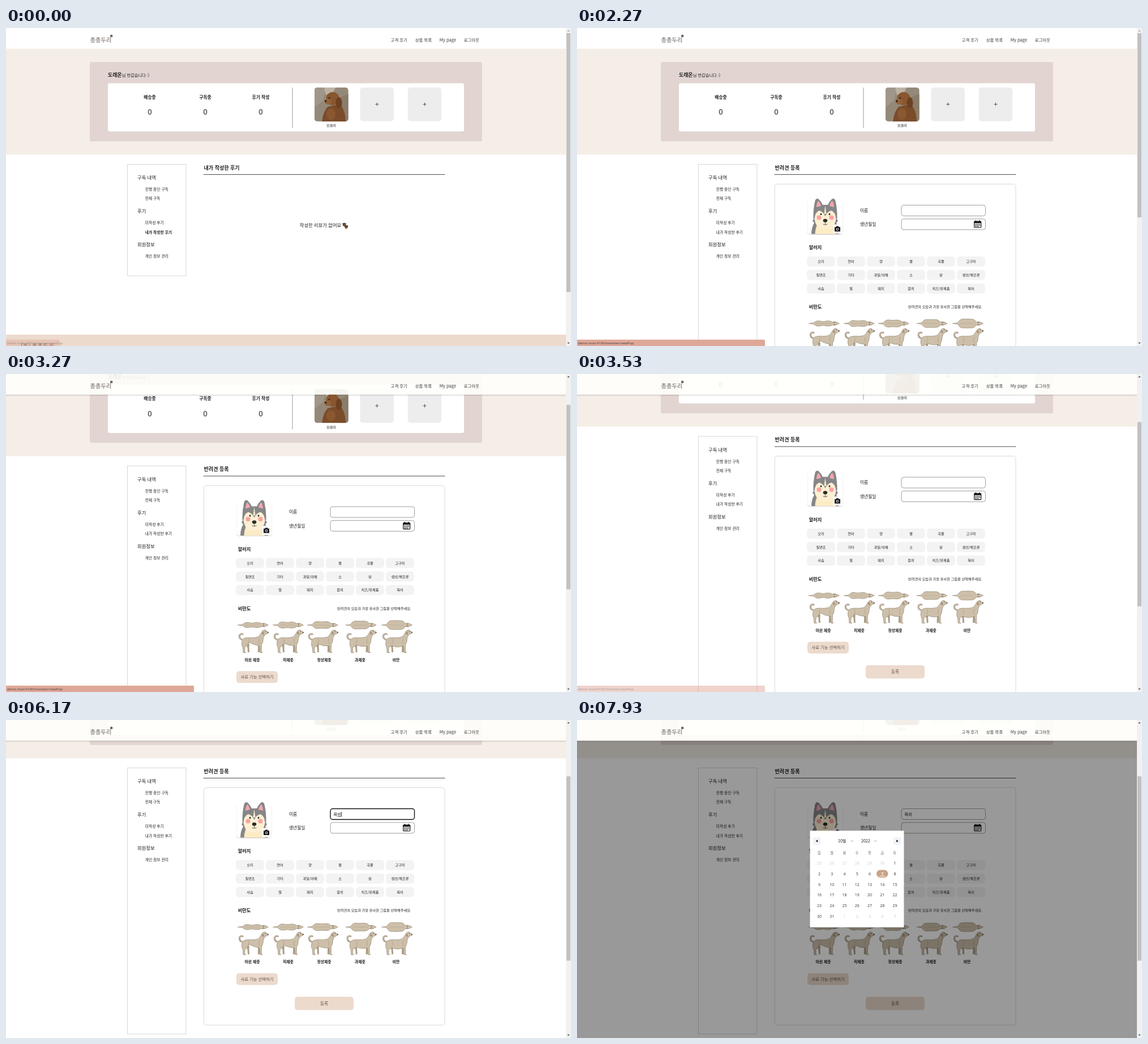
An HTML page for the animation above (8000 ms loop, 998 by 561 pixels).

```html
<!DOCTYPE html>
<html lang="ko">
<head>
<meta charset="utf-8">
<title>반려견 등록</title>
<style>
html, body { margin: 0; width: 100%; height: 100%; overflow: hidden; background: #fff; }
svg { display: block; width: 100vw; height: 100vh; }
text { font-family: "Noto Sans CJK KR", "Noto Sans KR", "Noto Sans CJK", "Noto Sans CJK JP", sans-serif; white-space: pre; }
.latin { font-family: "Noto Sans", "Open Sans", sans-serif; }
</style>
</head>
<body>
<svg id="stage" viewBox="0 0 998 561" xmlns="http://www.w3.org/2000/svg"></svg>
<script>
const LOOP = 8000;
const NOTCH = 52, SCROLLED = NOTCH * 3;
const BRAND = '총총두리', OWNER = '도래온', PET = '보슬이', LINK = 'demo-host:4100/member/newPup';

// y is the vertical middle of the glyphs
const text = (x, y, str, size, o = {}) =>
  `<text x="${x}" y="${(y + size * 0.37).toFixed(2)}" font-size="${size}" fill="${o.fill || '#1c1c1c'}"` +
  ` font-weight="${o.w || 500}" text-anchor="${o.mid ? 'middle' : 'start'}"` +
  `${o.cls ? ` class="${o.cls}"` : ''}${o.id ? ` id="${o.id}"` : ''}>${str}</text>`;
const mid = (x, y, str, size, o = {}) => text(x, y, str, size, { ...o, mid: true });
const box = (x, y, w, h, fill, r = 0, extra = '') =>
  `<rect x="${x}" y="${y}" width="${w}" height="${h}" rx="${r}" fill="${fill}" ${extra}/>`;
const path = (d, fill, extra = '') => `<path d="${d}" fill="${fill}" ${extra}/>`;
const dot = (x, y, r, fill, ry = r) => `<ellipse cx="${x}" cy="${y}" rx="${r}" ry="${ry}" fill="${fill}"/>`;
const group = (id, body, extra = '') => `<g id="${id}" ${extra}>${body}</g>`;

function photo() {
  return `<g clip-path="url(#photoClip)">` +
    box(545, 105, 60, 60, '#948979') +
    path('M545 105H566L560 128L545 140Z', '#a0968a') +
    path('M562 105H582L578 114L565 118Z', '#bdb3a4') +
    path('M586 124L605 116V165H586Z', '#8a7c6a') +
    path('M558 165Q560 148 568 139L590 134Q600 146 600 165Z', '#7b4c2a') +
    dot(577, 124.5, 11.5, '#88562f', 11.5) + dot(588, 132, 5.5, '#6c4123', 10) +
    dot(569, 130, 6, '#93613a', 5) + dot(574, 152, 8, '#8a5831', 10) +
    dot(564.6, 129, 1.7, '#2a1a12') + dot(571, 123.5, 1.2, '#2a1a12') + '</g>';
}

function addTile(x) {
  return box(x, 105, 59.5, 59.5, '#ededed', 5) +
    path(`M${x + 26.8} 134.5h6M${x + 29.8} 131.5v6`, 'none', 'stroke="#444" stroke-width=".9"');
}

function summary() {
  let s = box(0, 36.5, 990, 187, '#f5eee7') + box(148, 60, 693, 140, '#e2d5d1', 3) +
    text(180, 83, OWNER, 8.9, { w: 700 }) + text(204.7, 83.6, '님 반갑습니다 :)', 7.25) +
    box(180, 98.2, 629, 85.3, '#d3c7c3', 3) + box(180, 97.5, 629, 85.3, '#fff', 3);
  ['배송중', '구독중', '후기 작성'].forEach((name, i) => {
    s += mid(254 + 98 * i, 122, name, 7.8, { w: 600 }) + mid(254 + 98 * i, 148, '0', 13.5, { w: 700, fill: '#666' });
  });
  return s + box(505.5, 105, 1, 71, '#999') + photo() + mid(574.5, 171.7, PET, 6.2) +
    addTile(625.5) + addTile(709.7);
}

function menu(height, active) {
  const heads = [['구독 내역', 264.3], ['후기', 323], ['회원정보', 382]];
  const items = [['진행 중인 구독', 284.5], ['전체 구독', 300.6], ['미작성 후기', 343.8],
    ['내가 작성한 후기', 360], ['개인 정보 관리', 402.6]];
  return box(214.5, 240.5, 103.5, height, '#fff', 0, 'stroke="#d2d2d2" stroke-width=".9"') +
    heads.map(([n, y]) => text(232, y, n, 8.3)).join('') +
    items.map(([n, y], i) => text(245.8, y, n, 6.75, { w: i === active ? 700 : 500 })).join('');
}

const title = name => text(349.6, 246.3, name, 9, { w: 700 }) + box(348.7, 258, 426.8, 1, '#4c4c4c');

function paw(x, y) {
  return dot(x, y + .8, 2.6, '#5c3a22', 2.3) +
    [-2.2, 0, 2.2].map(d => dot(x + d, y - 2 + Math.abs(d) * .3, 1.1, '#3a2417')).join('') +
    dot(x, y + 1.2, 1.2, '#a8744f', .9);
}

function emptyView() {
  return menu(196.5, 3) + title('내가 작성한 후기') +
    text(518.8, 348, '작성한 리뷰가 없어요', 8.3) + paw(597.5, 346.7) + paw(601, 350.8) +
    box(0, 541, 990, 130, '#ecdacd') + text(26, 561.5, `(주) ${BRAND}`, 10.6, { fill: '#4c403a' });
}

// Everything inside the form is laid out for the fully scrolled page
function husky() {
  return path('M414 207.5Q414 196 419 188L416 184L420 178H457L461 184L458 188Q463 196 463 207.5Z', '#868688') +
    path('M417.5 180Q417 164 420.5 149Q422.5 143 427 146Q432 151 434 156H443Q445 151 450 146Q454.5 143 456.5 149Q460 164 459.5 180Z', '#868688') +
    path('M423 160Q423.5 151 426.5 149Q430.5 154 431 158Z', '#f3a7ae') +
    path('M454 160Q453.5 151 450.5 149Q446.5 154 446 158Z', '#f3a7ae') +
    path('M420.5 207.5Q421 196 425 190L452 190Q456 196 456.5 207.5Z', '#fcebc5') +
    path('M419.5 182Q420 169 428 166Q435 168 438.5 176Q442 168 449 166Q457 169 457.5 182Q455 193 449 198H428Q422 193 419.5 182Z', '#fdefd2') +
    path('M438.5 157L440.5 172H436.5Z', '#fdefd2') +
    dot(427.5, 178.5, 4, '#f7a3a6') + dot(449.5, 178.5, 4, '#f7a3a6') +
    dot(431, 172.5, 1.4, '#2b2b2b', 1.7) + dot(446, 172.5, 1.4, '#2b2b2b', 1.7) +
    dot(438.5, 183.7, 3.8, '#2b2b2b', 3) +
    path('M434.5 190Q438.5 192.5 442.5 190M438.5 185V191', 'none', 'stroke="#2b2b2b" stroke-width=".7"');
}

const camera = () => box(452, 190.5, 16.5, 16, '#fff', 4) +
  path('M455 195.2H457.3L458.4 193.6H461.6L462.7 195.2H465V203H455Z', '#111') +
  dot(460, 199, 2.3, '#fff') + dot(460, 199, 1.4, '#111');

function calendarIcon() {
  let s = box(701.7, 185.2, 12, 10.8, '#fff', 1, 'stroke="#111" stroke-width="1.2"') +
    box(701.5, 185, 12.4, 3.2, '#111') + box(703.6, 183.2, 1.6, 3.4, '#111', .6) + box(710.2, 183.2, 1.6, 3.4, '#111', .6);
  for (let i = 0; i < 11; i++) s += box(703.4 + (i % 4) * 2.4, 189.4 + (i >> 2) * 2.1, 1.5, 1.3, '#111');
  return s;
}

function bodyShape(x, fat) {
  const line = 'stroke="#857760" stroke-width=".6" stroke-linejoin="round"', tan = '#cdbfa9';
  const hip = 4.6 + fat * .8, waist = 2.2 + fat * 1.5;
  const half = `M0 0L9 -1.2Q13 ${-hip - 1} 19 ${-hip}Q26 ${-waist} 32 ${-hip}Q38 ${-hip - .6} 42 -2.6Q46 -4.2 50 -2L54 0`;
  const back = 'M36 25L35.5 40H37.6L39.5 27ZM15 26L17.2 33L17.6 40H19.6L19.2 32L19.6 26Z';
  const side = `M8 18Q12 14 20 14.6Q28 15.4 35 13.4Q39 11 41 6Q43 1.5 46.5 1Q49 .6 50 3L53.6 4.8Q54 7.2 49.4 8.4Q46 10 44.6 16` +
    `Q44.6 23 41.6 27L41.4 39.4L43.4 41H39L37.6 29Q28 ${27.5 + fat * 1.4} 20 ${23 + fat * 1.6}` +
    `Q17 28 12.4 31.5L11.8 39.4L14 41H9.2L8.6 32.5Q5 26 8 18Z`;
  const tail = w => `stroke-width="${w}" stroke-linecap="round"`;
  const tailLine = 'M9.5 19Q1.4 17 2.6 11Q4.6 7 8.4 8.5';
  return `<g transform="translate(${x} 365.3)">${path(half, tan, line)}<g transform="scale(1 -1)">${path(half, tan, line)}</g>` +
    path('M12 0H40', 'none', 'stroke="#b3a288" stroke-width=".7"') +
    path('M44 -3L47 -1.5L45 0ZM44 3L47 1.5L45 0Z', '#8f7f68') + '</g>' +
    `<g transform="translate(${x + .5} 373)">` +
    path(tailLine, 'none', 'stroke="#857760" ' + tail(2.7)) + path(back, '#b5a58c', line) + path(side, tan, line) +
    path(tailLine, 'none', `stroke="${tan}" ` + tail(1.6)) +
    path('M43 4Q46 4 46 9Q43 10 42.4 7Z', '#a3927a') + dot(53, 5.4, .9, '#332b22') + dot(48.5, 3.6, .6, '#332b22') +
    path('M38 16Q35 21 38 26M18 17Q21 21 17 26', 'none', 'stroke="#a89880" stroke-width=".7"') + '</g>';
}

function formView() {
  const field = (y, id) => box(573, y, 148.5, 19, '#fff', 4, `id="${id}"`);
  const chips = ['오리 연어 양 쌀 곡물 고구마', '칠면조 기타 과일/야채 소 닭 생선/해조류', '사슴 밀 돼지 참치 치즈/유제품 북어'];
  const levels = ['야윈 체중', '저체중', '정상체중', '과체중', '비만'];
  const starts = [409.3, 471.3, 532.3, 600, 663.5];
  let s = box(349.3, 119.3, 425.7, 418.9, '#fff', 4.5, 'stroke="#d9d4cf" stroke-width=".9"') +
    box(407, 147, 62.5, 61.8, '#000', 5, 'opacity=".16"') + box(407.3, 146, 62, 61.8, '#fff', 5) +
    group('portrait', husky()) + camera() +
    text(499.7, 166, '이름', 7.8) + text(499.7, 190.3, '생년월일', 7.8) +
    field(156.5, 'nameField') + field(180.8, 'dateField') + calendarIcon() +
    text(578.6, 166.2, '', 7.3, { id: 'petName', w: 400 }) +
    box(586, 170.1, 6.6, .7, '#222', 0, 'id="compose"') + box(578.3, 162, .9, 8.2, '#111', 0, 'id="caret"') +
    text(409.7, 231.2, '알러지', 8.25, { w: 600 }) + text(409.7, 336, '비만도', 8.25, { w: 600 }) +
    text(585, 336, '반려견의 모습과 가장 유사한 그림을 선택해주세요.', 6.22);
  chips.forEach((row, r) => row.split(' ').forEach((name, c) => {
    const x = 406 + 53 * c, y = 247 + 23.8 * r;
    s += box(x, y, 50, 17.8, '#f3f3f3', 5.5) + mid(x + 25, y + 9, name, 6.2);
  }));
  s += group('bodies', starts.map(bodyShape).join(''));
  levels.forEach((name, i) => { s += mid(435 + 63.5 * i, 426.5, name, 6.8, { w: 600 }); });
  s += box(407, 446.8, 73, 20.7, '#ecdacd', 5) + mid(443.5, 457, '사료 기능 선택하기', 7.35, { fill: '#5f5047' }) +
    box(510, 488.3, 104, 23.4, '#ecdacd', 5) + mid(562, 500, '등록', 7.5, { fill: '#5f5047' });
  return menu(469.5, -1) + title('반려견 등록') + `<g transform="translate(0 ${SCROLLED})">${s}</g>`;
}

function header() {
  const o = { w: 500, fill: '#3c3c3c' };
  return group('bar', box(0, 0, 990, 36.5, '#fffffc', 0, 'opacity=".9"') + box(0, 36.5, 990, 3, 'url(#shade)')) +
    text(148.5, 20.7, BRAND, 10.3, { w: 400, fill: '#6b625c' }) + dot(186.2, 14, 2.3, '#6b625c') +
    text(679.6, 21, '고객 후기', 7.4, o) + text(722.7, 21, '상품 목록', 7.4, o) +
    text(765.7, 21, 'My page', 7.6, o) + text(808.7, 21, '로그아웃', 7.4, o);
}

function datePicker() {
  const colX = c => 428 + 22.25 * c;
  const chevron = x => path(`M${x - 2} 212.6l2 2l2 -2`, 'none', 'stroke="#777" stroke-width=".8"');
  let s = box(411.5, 196, 166, 171, '#000', 1, 'opacity=".12"') + box(411.5, 195.3, 166, 170.5, '#fff') +
    box(417.3, 207, 12.8, 13, '#eef3f9', 1) + path('M425.2 211.3V215.7L421.8 213.5Z', '#111') +
    box(559.2, 207, 12.8, 13, '#eef3f9', 1) + path('M564.2 211.3V215.7L567.6 213.5Z', '#111') +
    text(461, 213.6, '10월', 7.1) + chevron(485.5) + text(502, 213.6, '2022', 7.1) + chevron(527);
  [...'일월화수목금토'].forEach((d, c) => { s += mid(colX(c), 235, d, 6.3, { fill: '#666' }); });
  s += box(529, 264.5, 20.5, 13.4, '#c9a386', 6.7);
  for (let i = 0; i < 42; i++) {
    const n = i - 5, x = colX(i % 7), y = 252.6 + 18.67 * Math.floor(i / 7);
    const day = n < 1 ? n + 30 : n > 31 ? n - 31 : n;
    const fill = n === 7 ? '#fff' : day === n ? '#444' : '#cfcfcf';
    s += mid(x, y, day, 7.1, { fill, w: n === 7 ? 700 : 400, cls: 'latin' });
  }
  return s + box(534.3, 275, 10, .9, '#fff');
}

const statusBar = () => path('', '#dfa798', 'id="statusBox"') +
  text(2, 555.4, LINK, 6.05, { cls: 'latin', w: 400, fill: '#4a4040' });

const scrollbar = () => box(989, 0, 9, 561, '#f1f1f1') + box(990, 9, 7, 457, '#c1c1c1', 0, 'id="thumb"') +
  path('M991.3 6L993.5 3.6L995.7 6Z', '#a3a3a3', 'id="up"') + path('M991.3 554.8L993.5 557.2L995.7 554.8Z', '#505050');

const defs = `<defs><clipPath id="photoClip"><rect x="544.8" y="105" width="59.8" height="59.8" rx="5"/></clipPath>
<linearGradient id="shade" x2="0" y2="1"><stop stop-color="#000" stop-opacity=".16"/><stop offset="1" stop-color="#000" stop-opacity="0"/></linearGradient></defs>`;

document.getElementById('stage').innerHTML = defs + box(0, 0, 998, 561, '#fff') +
  group('page', summary() + group('empty', emptyView()) + group('form', formView())) +
  box(0, 36.5, 990, 525, '#000', 0, 'id="dim" opacity=".4"') +
  header() + group('picker', datePicker()) + group('status', statusBar()) + scrollbar();

const el = id => document.getElementById(id);
const set = (id, attrs) => { for (const k in attrs) el(id).setAttribute(k, attrs[k]); };
const show = (id, on) => set(id, { display: on ? 'inline' : 'none' });
const ramp = (t, a, b) => Math.min(1, Math.max(0, (t - a) / (b - a)));
const ease = p => (1 - Math.cos(Math.PI * p)) / 2;
const outline = on => on ? { stroke: '#111', 'stroke-width': 1.4 } : { stroke: '#939393', 'stroke-width': .9 };

const WHEEL = [3057, 3180, 3440], GLIDE = 180;
const TYPING = [[5400, 'ㅉ'], [5570, '짜'], [5730, '짭'], [6070, '짜비']];
const OPEN = 1870, IMAGES = 2200, FOCUS = 4330, BLUR = 7430, PICK = 7800;

function draw(t) {
  const scroll = WHEEL.reduce((sum, a) => sum + NOTCH * ease(ramp(t, a, a + GLIDE)), 0);
  const open = t >= OPEN, focus = t >= FOCUS && t < BLUR;

  set('page', { transform: `translate(0 ${-scroll})` });
  show('empty', !open);
  show('form', open);
  show('portrait', t >= IMAGES);
  show('bodies', t >= IMAGES + 30);
  set('bar', { opacity: ramp(scroll, 20, 50) });

  const pageH = open ? 937 : 667, track = 543;
  set('thumb', { y: 9 + scroll / pageH * track, height: 561 / pageH * track });
  set('up', { fill: scroll > 0 ? '#505050' : '#a3a3a3' });

  const alpha = t < 900 ? .45 * (1 - ramp(t, 0, 130)) : ramp(t, 880, 1100) * (1 - ramp(t, 3430, 3630));
  const w = 95 + 237 * ease(ramp(t, 1880, 2030));
  set('status', { opacity: alpha });
  set('statusBox', { d: `M0 549.7H${w - 2}Q${w} 549.7 ${w} 551.7V561H0Z` });

  const typed = TYPING.filter(k => t >= k[0]).map(k => k[1]).pop() || '';
  const end = 578.4 + typed.length * 6.9;
  el('petName').textContent = typed;
  set('nameField', outline(focus));
  set('dateField', outline(false));
  show('compose', focus && typed);
  set('compose', { x: end - 6.7 });
  show('caret', focus && !(t >= 4870 && t < 5400) && !(t >= 6630 && t < 7170));
  set('caret', { x: end });

  show('dim', t >= PICK);
  show('picker', t >= PICK);
}

const start = performance.now();
function tick() {
  draw((performance.now() - start) % LOOP);
  requestAnimationFrame(tick);
}
tick();
</script>
</body>
</html>
```
